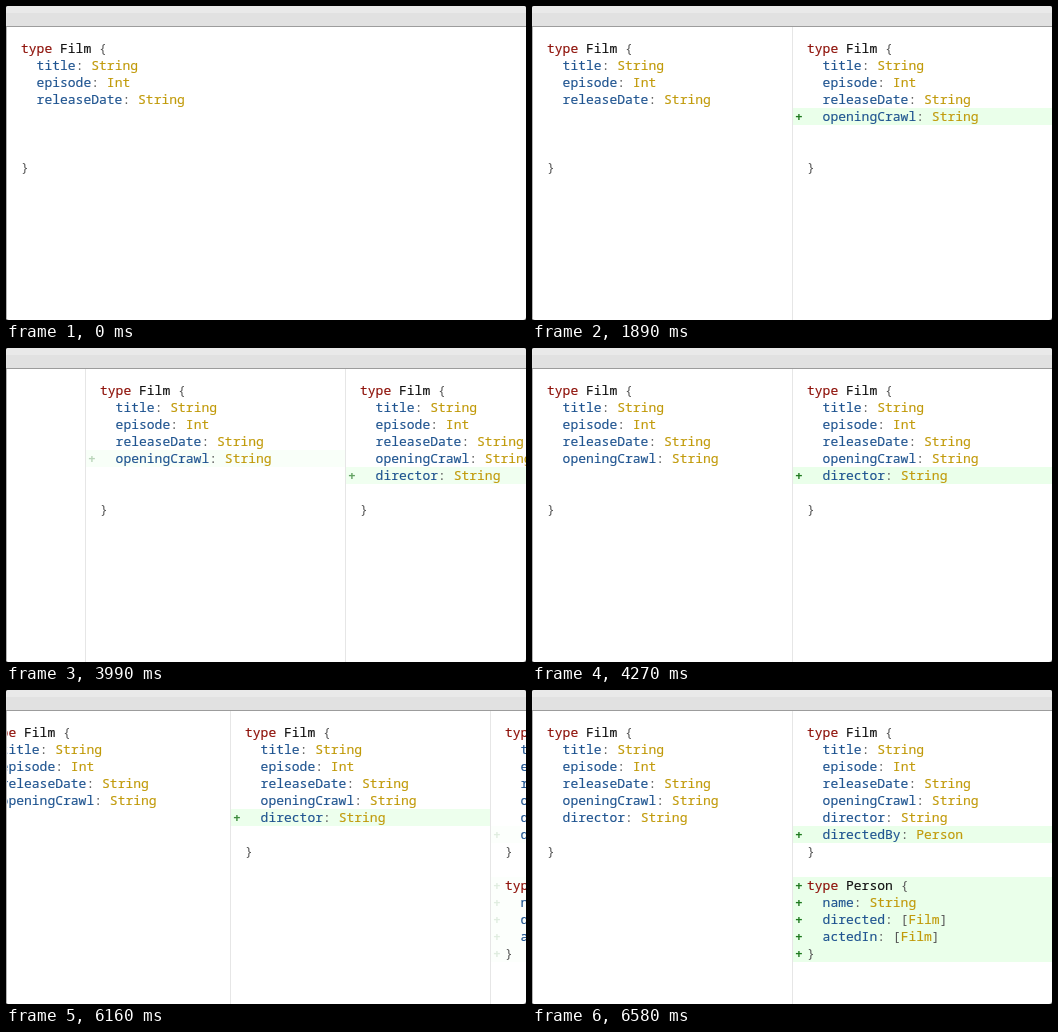
An HTML page that plays this animation: 520 px wide and 314 px high, repeating every 8000 ms.

```html
<!DOCTYPE html>
<html lang="en">
<head>
<meta charset="utf-8">
<title>Schema evolution</title>
<style>
  html, body { margin: 0; width: 100%; height: 100%; overflow: hidden; background: #555; }
  svg { display: block; width: 520px; height: 314px; }
  text { font: 500 13px "Noto Sans Mono", monospace; white-space: pre; fill: #555; stroke-width: .15px; }
  .keyword { fill: #8e1109; stroke: #8e1109; }
  .name { fill: #111; stroke: #111; }
  .field { fill: #1f5490; stroke: #1f5490; }
  .type { fill: #c19a0a; stroke: #c19a0a; }
  .plus { fill: #1f7a1f; font-weight: 700; }
  .added { fill: #eaffea; }
  .divider { fill: #e6e6e6; }
</style>
</head>
<body>
<svg viewBox="0 0 520 314">
  <clipPath id="window"><rect width="520" height="314" rx="3"/></clipPath>
  <clipPath id="content"><rect x="1" y="21" width="519" height="293"/></clipPath>
  <g clip-path="url(#window)">
    <rect width="520" height="314" fill="#fff"/>
    <g clip-path="url(#content)"><g id="panes"></g></g>
    <rect width="520" height="7" fill="#e9e9e9"/>
    <rect y="7" width="520" height="13" fill="#e1e1e1"/>
    <rect y="20" width="520" height="1" fill="#9c9c9c"/>
    <rect y="21" width="1" height="293" fill="#b4b4b4"/>
  </g>
</svg>
<script>
const PANE = 260, LINE = 17, TOP = 34, BASELINE = 47;
const LOOP = 8000, STEP = 70, SLIDE = 620;
const INTRO = 1240, INTRO_VISIBLE = 1470, SCROLLS = [3633, 5958];

const film = ['title: String', 'episode: Int', 'releaseDate: String'];
const person = ['type Person {', '  name: String', '  directed: [Film]', '  actedIn: [Film]', '}'];
const fields = ['openingCrawl: String', 'director: String', 'directedBy: Person'];

const schema = count => {
  const lines = ['type Film {', ...[...film, ...fields.slice(0, count)].map(f => '  ' + f)];
  lines[7] = '}';
  if (count === 3) lines.splice(9, 0, '', ...person);
  return Array.from(lines, line => line || '');
};

const highlight = line => line.replace(
  /(\btype\b)|(\w+(?= \{))|(\w+(?=:))|(\w+)/g,
  (word, keyword, name, field) => {
    const kind = keyword ? 'keyword' : name ? 'name' : field ? 'field' : 'type';
    return `<tspan class="${kind}">${word}</tspan>`;
  });

const textAt = (x, row, content, kind = '') =>
  `<text class="${kind}" x="${x}" y="${BASELINE + LINE * row}" xml:space="preserve">${content}</text>`;

function paneMarkup(count) {
  const lines = schema(count);
  // The blank row between the two types keeps the second one on row 9.
  if (count === 3) lines.splice(8, lines.length - 8, '', ...person);
  const added = count ? [count + 3] : [];
  if (count === 3) added.push(...person.map((_, i) => 9 + i));
  const marks = added.map(row =>
    `<rect class="added" x="1" y="${TOP + LINE * row}" width="${PANE - 1}" height="${LINE}"/>` +
    textAt(3, row, '+', 'plus')).join('');
  const code = lines.map((line, row) => line && textAt(15, row, highlight(line))).join('');
  return `<g class="pane"><rect class="divider" y="21" width="1" height="293"/>` +
    `<g class="marks">${marks}</g><g class="code">${code}</g></g>`;
}

document.getElementById('panes').innerHTML = [0, 1, 2, 3].map(paneMarkup).join('');
const panes = [...document.querySelectorAll('.pane')].map(root => ({
  root, marks: root.querySelector('.marks'), code: root.querySelector('.code')
}));

const easeInOut = x => x < .5 ? 4 * x ** 3 : 1 - 4 * (1 - x) ** 3;
const progress = (time, start) => easeInOut(Math.min(1, Math.max(0, (time - start) / SLIDE)));

function draw(now) {
  const time = Math.floor(now % LOOP / STEP) * STEP;
  const scroll = SCROLLS.reduce((sum, start) => sum + progress(time, start), 0);
  const intro = time < INTRO_VISIBLE ? 0 : progress(time, INTRO);

  panes.forEach(({ root, marks, code }, i) => {
    root.setAttribute('transform', `translate(${Math.round(PANE * (i - scroll))})`);
    marks.setAttribute('opacity', Math.max(0, 1 - Math.abs(scroll - i + 1)));
    if (i === 1) {
      root.setAttribute('opacity', intro);
      code.setAttribute('transform', `translate(${PANE * (intro - 1)})`);
    }
  });
}

const start = performance.now();
function tick() {
  draw(performance.now() - start);
  requestAnimationFrame(tick);
}
tick();
</script>
</body>
</html>
```
